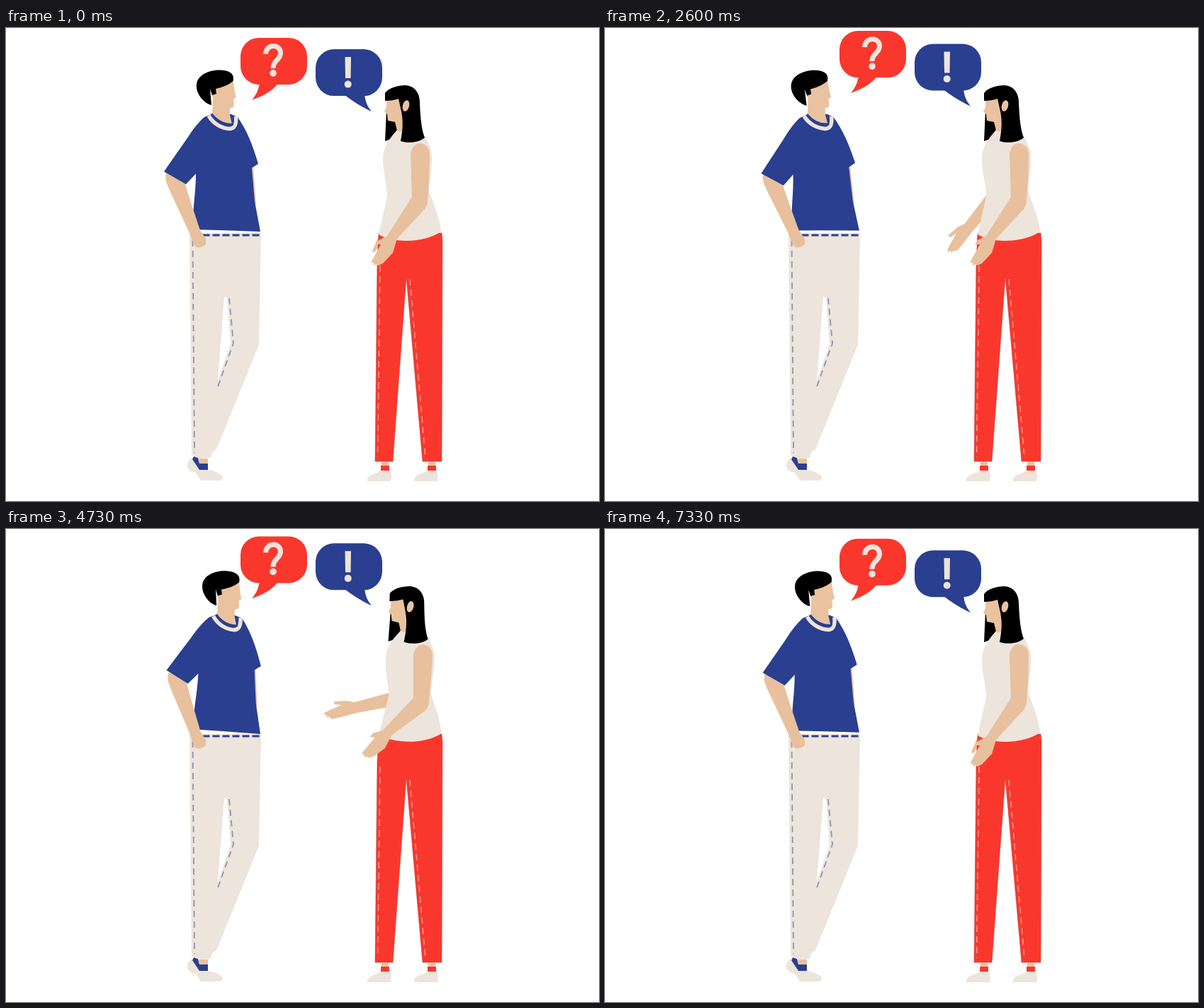
An HTML page that plays this animation: 837 px wide and 669 px high, repeating every 7.41 s.

```html
<!DOCTYPE html>
<html lang="en">
<head>
<meta charset="utf-8">
<title>Conversation</title>
<style>
  html, body { margin: 0; width: 100%; height: 100%; overflow: hidden; background: #fff; }
  svg { display: block; width: 100%; height: 100%; }
  .red { fill: #fa372d; }
  .blue { fill: #2a3f8f; }
  .cream { fill: #ede4db; }
  .skin { fill: #e8c09d; }
  .face { fill: #eac2a0; }
  .line { fill: none; }
  .mark { fill: none; stroke: #ede4db; }
</style>
</head>
<body>
<svg viewBox="0 0 837 669">
  <!-- man -->
  <path class="cream" fill-rule="evenodd" d="M259 290H360L357 448 297 596Q290 598 289 608L275 609 262 604ZM308 380L312 382 317 447 299 499Z"/>
  <g class="line" stroke="#9093b0" stroke-width="1.8" stroke-dasharray="9 6">
    <path d="M263.5 300L266 601"/>
    <path d="M315 382L321 446 298 510"/>
  </g>
  <path class="line" stroke="#2a3f8f" stroke-width="3.2" stroke-dasharray="10 4" d="M277.5 293H358"/>
  <path class="cream" d="M262 608C252 616 254 626 268 629L275 640H302Q309 638 304 632Q295 626 284 625L272 624Z"/>
  <path class="blue" d="M265 606L271 608 273 616H285V625H273L263 610Z"/>
  <path class="skin" d="M272 609H285V616H273Z"/>

  <g id="manBody">
    <path class="skin" d="M345 196L349 198 353 250 347 245Z"/>
    <path class="blue" d="M290 122L280 126 262 147 268 206C268 235 263 255 264 285Q310 286 359 288L351 245 347 198 356 192C348 165 340 145 327 126L318 122Z"/>
    <path class="mark" stroke-width="5.5" d="M286 124C293 136 305 142 316 142.500Q326 142 324.500 125"/>
    <path class="face" d="M289 85L320 70C322 82 322 90 325 98L321 101 322 109Q321 114 316 113L316 123 319 136C306 135 297 129 291 121L292 100Z"/>
    <path class="line" stroke="#2a3f8f" stroke-width="3" d="M290 121.500C298 132 308 137.500 321 136"/>
    <path d="M290 109C280 107 267 93 269 79C271 66 287 59 303 59.500C316 60 323 65 320.500 75C312 82 304 84 296 86L297 93 291 95 288 86Z"/>
  </g>
  <path id="manArm" class="skin" d="M226 204C223 215 228 222 232 232L259 290 266 308Q272 314 282 306L282 298 274 286 262 250 251 215Z"/>
  <path id="sleeve" class="blue" d="M280 126Q269 135 255 157L223 203 254 221 268 206 300 150Z"/>

  <!-- woman -->
  <g id="womanBack">
    <path id="backArm" class="skin" d="M545 231L490 246 479 244 461 245 462 249 472 250 460 255 447 261 448 264 451 264 450 267 455 267 458 270 471 267 494 261 543 252Z"/>
  </g>
  <path class="red" stroke="#b23a35" stroke-width=".5" d="M526 290H615L616 300 615 613H588L565 352 546 613H521L524 330Z"/>
  <g class="line" stroke="#f59a90" stroke-width="1.5" stroke-dasharray="9 6">
    <path d="M528 336L524.500 607"/>
    <path d="M570 355L592 608"/>
  </g>
  <g id="leg">
    <path class="skin" d="M530 613H540V620H530Z"/>
    <path class="red" d="M529 619H541V627H529Z"/>
    <path class="cream" d="M510 641Q509 633 522 630L529 626H542Q545 632 543 641Z"/>
  </g>
  <use href="#leg" x="66"/>

  <g id="womanBody">
    <path d="M537 116L535 160 544 157 552 144 556 116Z"/>
    <path class="cream" d="M553 143C546 152 533 163 532 185C532 205 538 222 538 238L526 292C540 302 585 307 614 288C613 270 602 245 597 230C599 210 603 190 600 172L592 154 562 143Z"/>
    <path class="face" d="M537 100V112L534 118 538 122 539 131 549 133 552 145Q558 149 561 143L562 98Z"/>
    <path d="M535 103V92C540 85 552 81 564 81C577 82 584 92 584 105C585 130 587 145 591 155C585 161 570 164 557 160C561 140 560 128 558 118L554 100Q546 103 535 103Z"/>
    <ellipse class="face" cx="564.5" cy="110" rx="4.6" ry="8" transform="rotate(14 564.5 110)"/>
    <path class="skin" d="M571 178Q574 163 585 163Q597 165 598 178Q598 210 595 246Q594 253 589 258L573 240Z"/>
    <path id="frontArm" class="skin" d="M573 239L538 294 526 300 522 306 529 306 515 332 519 332 519 336 523 334 525 336 532 333 546 318 552 298 591 256 594 244Z"/>
  </g>

  <!-- speech bubbles -->
  <g id="ask">
    <path class="red" d="M358 76C357 88 352 96 347 102C362 96 376 90 385 77Z"/>
    <rect class="red" x="331" y="14" width="94" height="66" rx="26"/>
    <path class="mark" stroke-width="7" d="M366.500 37C367 22 388 22 387.500 36C387 46 377 45 377 57"/>
    <circle class="cream" cx="377" cy="64" r="4.8"/>
  </g>
  <g id="reply">
    <path class="blue" d="M477 94Q496 109 516 118C510 111 507 104 506 93Z"/>
    <rect class="blue" x="437" y="30" width="94" height="66" rx="26"/>
    <path class="cream" d="M478.500 41H487L486.500 71H479Z"/>
    <circle class="cream" cx="482.7" cy="79.5" r="5"/>
  </g>
</svg>
<script>
const LOOP = 7410, CYCLE = LOOP / 2;
const pose = (id, value) => document.getElementById(id).setAttribute('transform', value);
const turn = (id, deg, x, y, dx = 0) => pose(id, `translate(${dx} 0) rotate(${deg} ${x} ${y})`);
const lift = (id, y) => pose(id, `translate(0 ${y})`);

// Smooth step from 0 to 1 between times a and b.
const ease = (t, a, b) => {
  const k = Math.min(1, Math.max(0, (t - a) / (b - a)));
  return (1 - Math.cos(Math.PI * k)) / 2;
};
const swell = (t, a, b, c, d) => ease(t, a, b) - ease(t, c, d);
const phase = (t, peak) => 2 * Math.PI * (t - peak) / CYCLE;

function draw(t) {
  const sway = t < 1200 ? ease(t + CYCLE, 2700, 4905) : 1 - ease(t, 1200, 2700) + ease(t, 2700, 4905);
  const manTilt = 4.08 * (sway - 0.43);
  turn('manBody', manTilt, 310, 290);
  turn('sleeve', manTilt, 310, 290);
  turn('manArm', manTilt * 0.9, 273, 300);

  const womanTilt = 1.85 * swell(t, 0, 900, 1700, 2550);
  turn('womanBack', womanTilt, 570, 300);
  turn('womanBody', womanTilt, 570, 300);

  // The far elbow slides back as the forearm drops.
  const drop = 1 - swell(t, 0, 900, 1750, 3300);
  turn('backArm', -62 * drop - 1.85, 541, 244, 10 * drop);
  turn('frontArm', 9 * swell(t, 0, 500, 1100, 2450), 584, 246);

  const p = phase(t, 240);
  lift('ask', 6.6 * Math.cos(p) - 0.7 * Math.cos(2 * p) - 5.7);
  lift('reply', 7.2 * Math.cos(phase(t, -130)) - 6.9);
}

const start = performance.now();
function tick() {
  draw((performance.now() - start) % CYCLE);
  requestAnimationFrame(tick);
}
tick();
</script>
</body>
</html>
```
